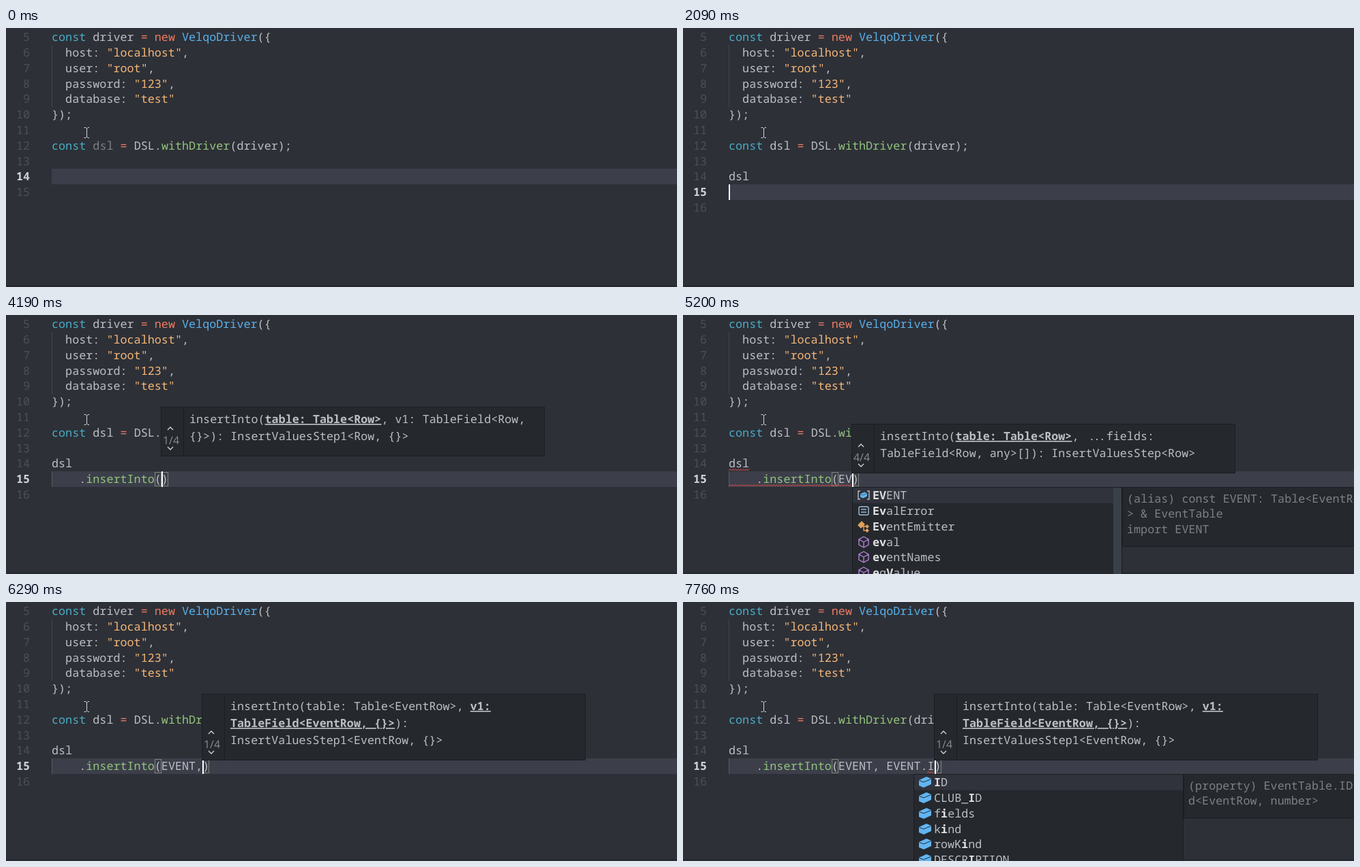
These frames come from a looping animation (984x381 px, 8000 ms). An HTML page:

```html
<!DOCTYPE html>
<html lang="en">
<head>
<meta charset="utf-8">
<title>Typing a query</title>
<style>
  html, body { margin: 0; width: 100%; height: 100%; overflow: hidden; background: #2d3037; }
  svg { display: block; width: 984px; height: 381px; }
  text { font: 16.75px "Noto Sans Mono", "DejaVu Sans Mono", monospace; fill: #bcbfc4; white-space: pre; text-rendering: geometricPrecision; }
  .key { fill: #4aacc5; }
  .op { fill: #ee7c62; }
  .type { fill: #5ab0ea; }
  .str { fill: #f5b678; }
  .fn { fill: #93c47d; }
  .dim { fill: #7d8185; }
  .num { fill: #4b4f58; text-anchor: end; }
  .now { fill: #cfd1d4; font-weight: 700; }
  .hit { fill: #dfe0e2; font-weight: 700; }
  .param { font-weight: 700; text-decoration: underline; }
  .count { font: 16px "Open Sans", sans-serif; fill: #898c92; text-anchor: middle; }
  .panel { fill: #25282d; stroke: #1b1d21; }
  .wave { fill: none; stroke: #d04a4c; }
  .line { fill: none; stroke-width: 1.4; }
</style>
</head>
<body>
<svg id="stage" viewBox="0 0 984 381"></svg>
<script>
const CHAR = 10.05, ROW = 22.8, LEFT = 67;
const colX = c => Math.round(LEFT + c * CHAR);
const baseline = n => Math.round(218.4 + (n - 14) * ROW) + 6;
const esc = s => s.replace(/&/g, '&amp;').replace(/</g, '&lt;');
const span = cls => s => `<tspan class="${cls}">${esc(s)}</tspan>`;
const text = (x, y, body, cls = '') => `<text x="${x}" y="${y}" class="${cls}">${body}</text>`;
const rect = (x, y, w, h, attrs) => `<rect x="${x}" y="${y}" width="${w}" height="${h}" ${attrs}/>`;
const path = (d, attrs) => `<path d="${d}" ${attrs}/>`;
// Parts between asterisks get the class
const marked = (s, cls) => s.split('*').map((p, i) => i % 2 ? span(cls)(p) : esc(p)).join('');
// Three dots set tight within their three cells
const tightDots = s => s.replace(/\.\.\.(.*)/, '<tspan dx="4" letter-spacing="-2.5">...</tspan><tspan dx="3.5">$1</tspan>');

const [key, op, type, str, fn, dim] = ['key', 'op', 'type', 'str', 'fn', 'dim'].map(span);
const header = [
  key('const') + ' driver ' + op('=') + ' ' + op('new') + ' ' + type('VelqoDriver') + '({',
  '  host: ' + str('"localhost"') + ',',
  '  user: ' + str('"root"') + ',',
  '  password: ' + str('"123"') + ',',
  '  database: ' + str('"test"'),
  '});'
];

const cube = path('M-9-3L2-8 9-5V3L-2 8-9 5Z', 'fill="#62b5f2"') +
  path('M-8.500-2.500L-2 0 8.500-4.500', 'fill="none" stroke="#25282d"');
const icons = {
  prop: cube,
  method: path('M0-8L7-4V4L0 8-7 4V-4ZM-7-4L0 0 7-4M0 0V8', 'class="line" stroke="#b180d7"'),
  kind: rect(-7, -6, 14, 12, 'rx="2" class="line" stroke="#9dbdd6"') +
    path('M-4-2H4M-4 2H4', 'class="line" stroke="#9dbdd6"'),
  cls: path('M-3-8L2-3-4 3-9-2ZM5-3L8 0 5 3 2 0ZM5 3L8 6 5 9 2 6Z', 'fill="#dfa05a"') +
    path('M-2 0H4M0 0V6H4', 'class="line" stroke="#dfa05a"'),
  var: path('M-5-6H-8V6H-5M5-6H8V6H5', 'class="line" stroke="#b9bcc1"') +
    `<g transform="scale(.55)">${cube}</g>`
};

function wave(from, to, y) {
  let d = `M${from} ${y}`;
  for (let x = from + 2, up = 1; x <= to; x += 2, up ^= 1) d += `L${x} ${y - up * 2.5}`;
  return path(d, 'class="wave"');
}

function drawSig(x, { top, index, lines }) {
  const bottom = top + 22 + lines.length * 25, mid = x + 13;
  const arrow = (y, dir) => path(`M${mid - 4} ${y + 2 * dir}l4 ${-4 * dir} 4 ${4 * dir}`, 'class="line" stroke="#d0d2d5"');
  return rect(x - .5, top + .5, 562, bottom - top, 'class="panel"') +
    path(`M${x + 32.5} ${top + 1}V${bottom}`, 'stroke="#1b1d21"') +
    arrow(bottom - 40, 1) + arrow(bottom - 11, -1) +
    text(mid + 1, bottom - 17.5, index + '/4', 'count') +
    lines.map((l, i) => text(x + 41, top + 24 + i * 25, tightDots(marked(l, 'param')))).join('');
}

function drawList(x, top, { rows, info, slider }) {
  const h = Math.round(rows.length * ROW + 2), side = x + 396;
  let out = rect(x + .5, top + .5, 395, h, 'class="panel"') +
    rect(x + 1, top + 1, 394, 22.8, 'fill="#30333b"');
  if (slider) out += rect(x + 383, top + 1, 12, h - 1, 'fill="#3a4047"');
  rows.forEach(([icon, label], i) => {
    const y = Math.round(top + 12.1 + i * ROW);
    out += `<g transform="translate(${x + 17} ${y})">${icons[icon]}</g>` +
      text(x + 30, y + 6, marked(label, 'hit'));
  });
  out += rect(side + .5, top + .5, 396, 20 + info.length * 22.3, 'class="panel"');
  return out + info.map((l, i) => text(side + 7, top + 23 + Math.round(i * 22.4), esc(l), 'dim')).join('');
}

const sigRow = { top: 135, index: 1, lines: ['insertInto(*table: Table<Row>*, v1: TableField<Row,', '{}>): InsertValuesStep1<Row, {}>'] };
const sigRest = { top: 160, index: 4, lines: ['insertInto(*table: Table<Row>*, ...fields:', 'TableField<Row, any>[]): InsertValuesStep<Row>'] };
const sigEvent = { top: 135, index: 1, lines: ['insertInto(table: Table<EventRow>, *v1:*', '*TableField<EventRow, {}>*):', 'InsertValuesStep1<EventRow, {}>'] };

const eventInfo = ['(alias) const EVENT: Table<EventRow', '> & EventTable', 'import EVENT'];
const dslList = {
  slider: true, info: ['const dsl: DSL'],
  rows: [['var', '*dsl*'], ['cls', '*DSL*'], ['method', '*d*n*sL*ookup'], ['method', '*d*ecode*Sl*ice'],
    ['method', '*d*efine*Sl*ot'], ['var', '*d*ata*S*et*L*ist'], ['kind', '*D*ata*Sl*ot']]
};
const methods = {
  rows: ['deleteFrom', 'insertInto', 'select', 'update'].map(m => ['method', m]),
  info: ['(method) DSL.deleteFrom<Row>(table:', ' Table<Row>): DeleteStep<Row>', '', 'Starts a delete statement']
};
const inserts = n => ({
  rows: [['method', '*' + 'insertInto'.slice(0, n) + '*' + 'insertInto'.slice(n)]],
  info: ['(method) DSL.insertInto<Row, {}>(ta', 'ble: Table<Row>, v1: TableField<Row', ', {}>): InsertValuesStep1<Row, {}> ', '(+3 overloads)']
});
const evList = {
  slider: true, info: eventInfo,
  rows: [['var', '*EV*ENT'], ['kind', '*Ev*alError'], ['cls', '*Ev*entEmitter'], ['method', '*ev*al'],
    ['method', '*ev*entNames'], ['method', '*e*q*V*alue']]
};
const eveList = {
  slider: true, info: eventInfo,
  rows: [['var', '*EVE*NT'], ['cls', '*Eve*ntEmitter'], ['method', '*eve*ntNames'], ['kind', '*Ev*al*E*rror'],
    ['method', 'emitKeypress*Eve*nts'], ['kind', 'USER_TO_*EVE*NT']]
};
const props = hit => ({
  info: ['(property) EventTable.ID: TableFiel', 'd<EventRow, number>'],
  rows: ['*I*D', 'CLUB_*I*D', 'f*i*elds', 'k*i*nd', 'rowK*i*nd', 'DESCR*I*PTION']
    .map(l => ['prop', hit ? l : l.replace(/\*/g, '')])
});

// Each step changes only the named parts of the state
const steps = [
  [0, { line: 14, typed: '', col: 0, caret: 0, used: 0, sig: 0, list: 0, errors: 0 }],
  [70, { caret: 1 }],
  [690, { typed: 'dsl', col: 3, list: dslList, listCol: 3 }],
  [1150, { used: 1, caret: 0 }],
  [1470, { caret: 1 }],
  [1700, { list: 0 }],
  [2090, { line: 15, typed: '', col: 0 }],
  [2560, { typed: '    ', col: 4 }],
  [2710, { typed: '    .', col: 5 }],
  [2870, { list: methods, listCol: 5 }],
  [3260, { typed: '    .in', col: 7, list: inserts(2), listCol: 7 }],
  [3490, { typed: '    .ins', col: 8, list: inserts(3), listCol: 8 }],
  [3800, { typed: '    .insertInto', col: 15, list: 0 }],
  [3960, { typed: '    .insertInto()', col: 16 }],
  [4190, { sig: sigRow }],
  [4270, { errors: 1 }],
  [4500, { caret: 0 }],
  [4890, { typed: '    .insertInto(E)', col: 17, caret: 1, sig: sigRest }],
  [5040, { list: evList, listCol: 17 }],
  [5200, { typed: '    .insertInto(EV)', col: 18, listCol: 18 }],
  [5360, { typed: '    .insertInto(EVE)', col: 19, list: eveList, listCol: 19 }],
  [5670, { typed: '    .insertInto(EVENT)', col: 21, list: 0 }],
  [5910, { errors: 0 }],
  [6060, { typed: '    .insertInto(EVENT,)', col: 22 }],
  [6290, { sig: sigEvent }],
  [6370, { typed: '    .insertInto(EVENT, )', col: 23 }],
  [6600, { typed: '    .insertInto(EVENT, E)', col: 24 }],
  [6830, { typed: '    .insertInto(EVENT, EV)', col: 25, list: evList, listCol: 25 }],
  [6990, { typed: '    .insertInto(EVENT, EVE)', col: 26, list: eveList, listCol: 26 }],
  [7290, { typed: '    .insertInto(EVENT, EVENT)', col: 28, list: 0 }],
  [7450, { typed: '    .insertInto(EVENT, EVENT.)', col: 29 }],
  [7600, { list: props(false), listCol: 27 }],
  [7760, { typed: '    .insertInto(EVENT, EVENT.I)', col: 30, list: props(true), wrong: 1 }]
];
let last = {};
const states = steps.map(([at, change]) => last = { ...last, ...change, at });

function draw(s) {
  const top = s.line === 14 ? 207 : 230, x = colX(s.col);
  const called = s.typed.includes('(');
  const code = (n, body) => text(LEFT, baseline(n), body);
  let out = rect(0, 378, 984, 3, 'fill="#272a30"') + rect(LEFT, top, 917, 23, 'fill="#3c3f4a"') +
    path('M67.5 25V116', 'stroke="#40444c"');
  for (let n = 5; n <= s.line + 1; n++) out += text(35, baseline(n), n, n === s.line ? 'num now' : 'num');
  header.forEach((body, i) => out += code(5 + i, body));
  out += code(12, key('const') + ' ' + (s.used ? 'dsl' : dim('dsl')) + ' ' + op('=') + ' DSL.' + fn('withDriver') + '(driver);');
  if (s.line === 15) out += code(14, 'dsl');
  if (s.typed.startsWith(' ')) out += path('M67.5 230V253', 'stroke="#555963"');
  if (called) {
    for (const c of [15, s.col]) out += rect(colX(c) + .5, top + 1.5, 9, 20, 'fill="none" stroke="#7c8579"');
  }
  out += code(s.line, called ? s.typed.replace('insertInto', fn('insertInto')) : s.typed);
  if (s.errors) out += wave(LEFT, colX(3), 229) + wave(LEFT, x, 252);
  if (s.wrong) out += wave(colX(29), x, 252);
  if (s.caret) out += rect(x, top, 2, 23, 'fill="#fff"');
  if (s.sig) out += drawSig(x, s.sig);
  if (s.list) out += drawList(colX(s.listCol), top + 23, s.list);
  // Mouse pointer
  return out + path('M114.500 146.500H117L118.500 148 120 146.500H122M118.500 148V160M114.500 161.500H117L118.500 160 120 161.500H122',
    'fill="none" stroke="#d4d6d9"');
}

const stage = document.getElementById('stage');
let shown;
function tick() {
  const now = performance.now() % 8000;
  const state = states.filter(s => s.at <= now).pop();
  if (state !== shown) stage.innerHTML = draw(shown = state);
  requestAnimationFrame(tick);
}
tick();
</script>
</body>
</html>
```
